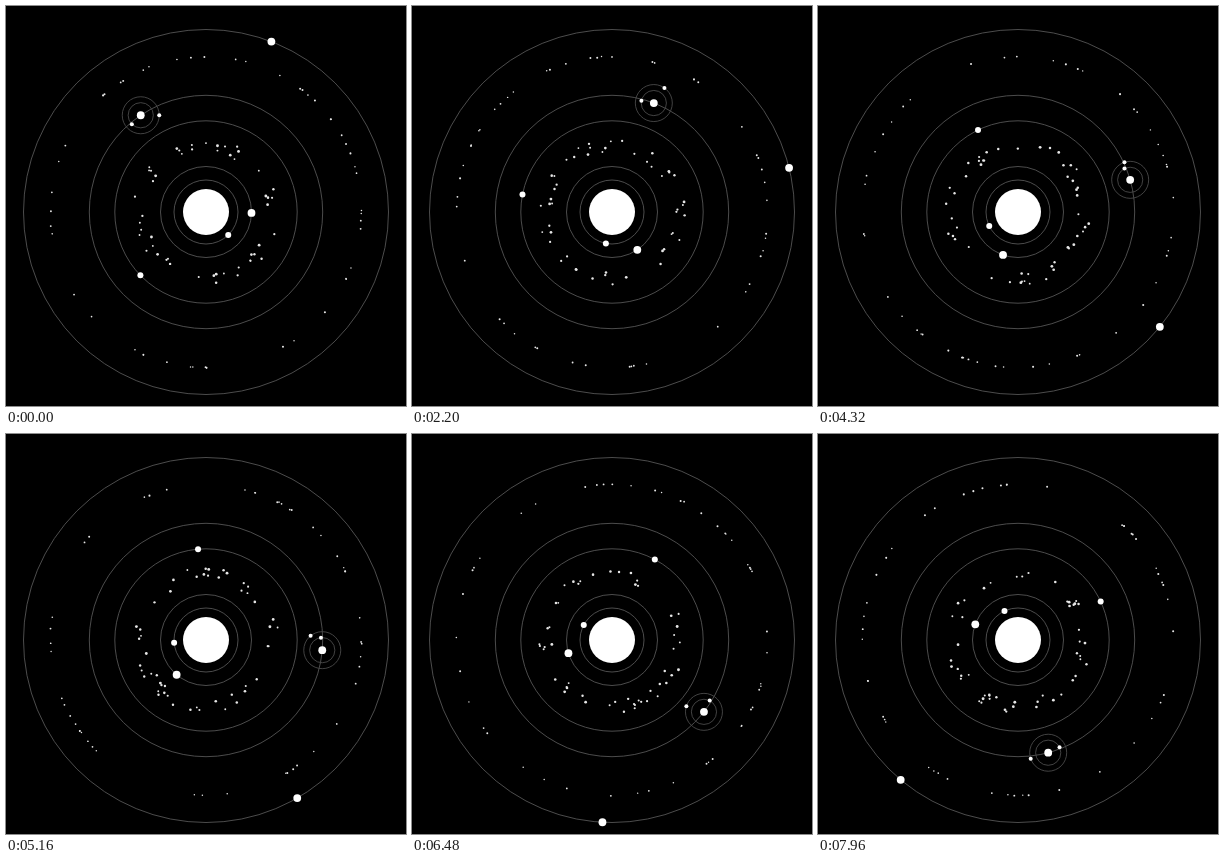
An HTML page that plays this animation: 400x400 px, repeating every 8000 ms.

```html
<!DOCTYPE html>
<html lang="en">
<head>
<meta charset="utf-8">
<title>Orbits</title>
<style>
  html, body { margin: 0; width: 100%; height: 100%; overflow: hidden; background: #000; }
  svg { display: block; width: 100vw; height: 100vh; }
  .ring { fill: none; stroke: #555; stroke-width: .9; }
  .moon-ring { fill: none; stroke: #4a4a4a; stroke-width: .9; }
  .body { fill: #fff; }
  .rock { fill: #e6e6e6; }
</style>
</head>
<body>
<svg id="stage" viewBox="0 0 400 400"></svg>
<script>
const LOOP = 8000, STEP = 40;
const CX = 200, CY = 206;
const svg = document.getElementById('stage');

function circle(cls, r, x = CX, y = CY) {
  const el = document.createElementNS('http://www.w3.org/2000/svg', 'circle');
  el.setAttribute('class', cls);
  el.setAttribute('r', r);
  place(el, x, y);
  svg.appendChild(el);
  return el;
}

function place(el, x, y) {
  el.setAttribute('cx', x.toFixed(2));
  el.setAttribute('cy', y.toFixed(2));
}

function polar(radius, deg, x = CX, y = CY) {
  const a = deg * Math.PI / 180;
  return [x + radius * Math.cos(a), y + radius * Math.sin(a)];
}

// Repeatable noise in 0..1
function noise(a, b, c) {
  let h = Math.imul(a + 1, 374761393) ^ Math.imul(b + 1, 668265263) ^ Math.imul(c + 1, 1274126177);
  h = Math.imul(h ^ (h >>> 15), 2246822519);
  h = Math.imul(h ^ (h >>> 13), 3266489917);
  return ((h ^ (h >>> 16)) >>> 0) / 4294967296;
}

// Orbit radius, start angle, body size
const planets = [
  { orbit: 32, start: 46, size: 3 },
  { orbit: 45.5, start: 1.2, size: 3.9 },
  { orbit: 91.2, start: 136, size: 3 },
  { orbit: 116.7, start: 236, size: 3.9 },
  { orbit: 182.5, start: -69, size: 3.9 }
];
const host = planets[3];
const moons = [
  { orbit: 12.6, start: 135, dir: 1, size: 2 },
  { orbit: 18.5, start: 0, dir: -1, size: 2 }
];
const belts = [
  { inner: 60, outer: 73, small: .9, large: 1.45, count: 50 },
  { inner: 155, outer: 156, small: .7, large: 1.05, count: 48 }
];

planets.forEach(p => circle('ring', p.orbit));
moons.forEach(m => m.ring = circle('moon-ring', m.orbit));
belts.forEach(b => b.rocks = Array.from({ length: b.count }, () => circle('rock', 1)));
circle('body', 23);
planets.concat(moons).forEach(p => p.el = circle('body', p.size));

// Belt rocks are scattered anew on every step
function scatter(belt, id, step) {
  belt.rocks.forEach((el, i) => {
    const rnd = k => noise(step, i, id * 3 + k);
    const radius = belt.inner + (belt.outer - belt.inner) * rnd(0);
    place(el, ...polar(radius, 360 * rnd(1)));
    el.setAttribute('r', (belt.small + (belt.large - belt.small) * rnd(2)).toFixed(2));
  });
}

let shown = -1;

function draw(ms) {
  const step = Math.floor((ms % LOOP) / STEP + .001);
  if (step === shown) return;
  shown = step;

  // Every body turns one degree per step
  planets.forEach(p => place(p.el, ...polar(p.orbit, p.start + step)));
  const [hx, hy] = polar(host.orbit, host.start + step);
  moons.forEach(m => {
    place(m.ring, hx, hy);
    place(m.el, ...polar(m.orbit, m.start + m.dir * step, hx, hy));
  });
  belts.forEach((b, id) => scatter(b, id, step));
}

const begin = performance.now();

function tick() {
  draw(performance.now() - begin);
  requestAnimationFrame(tick);
}

tick();
</script>
</body>
</html>
```
